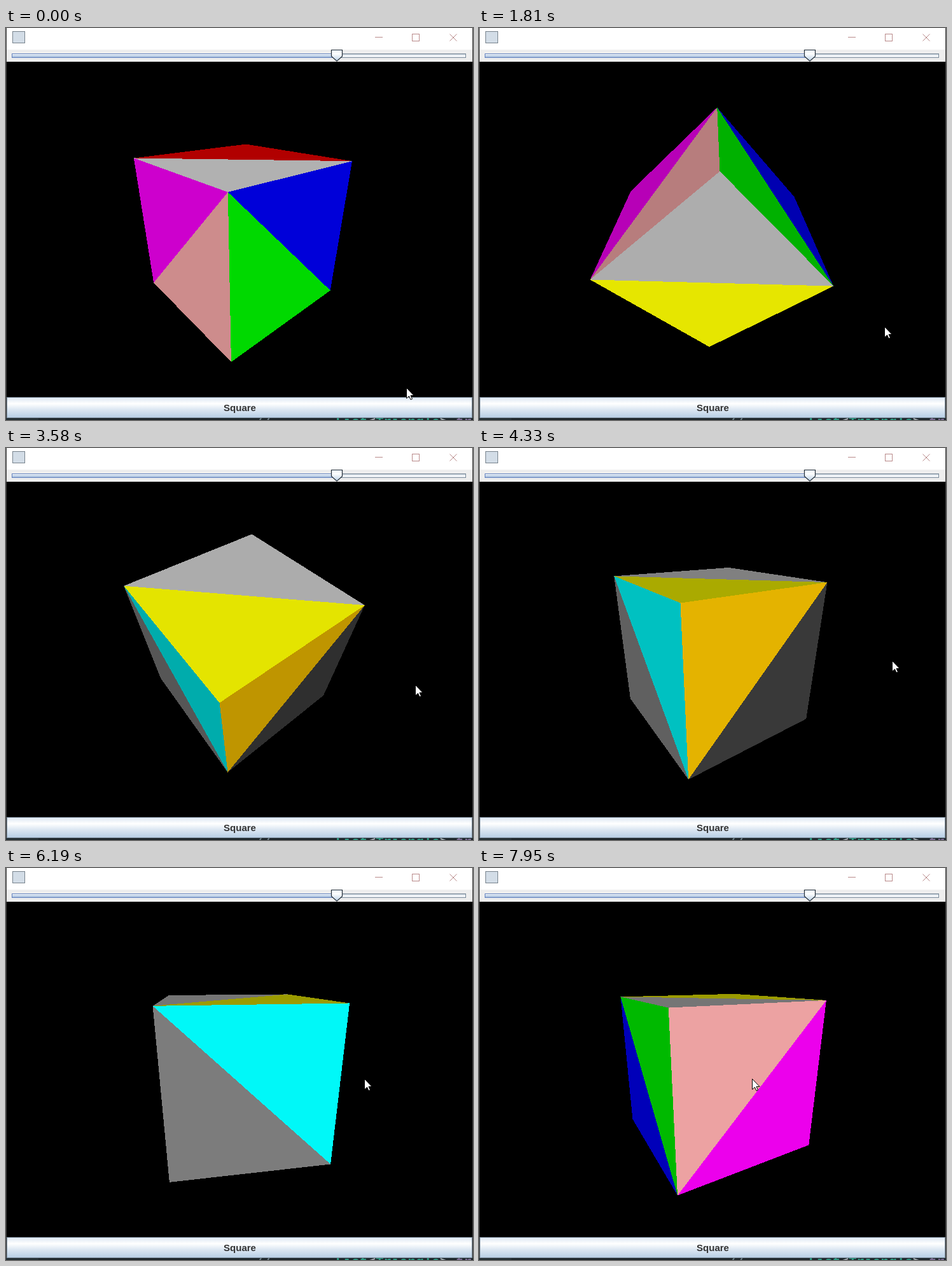
Write an HTML page with a canvas that moves like this. It is 734 by 616 pixels and loops after 8 s.

```html
<!DOCTYPE html>
<html lang="en">
<head>
<meta charset="utf-8">
<title>Cube viewer</title>
<style>
  html, body { margin: 0; width: 100%; height: 100%; overflow: hidden; background: #1e272c; }
  canvas { display: block; }
</style>
</head>
<body>
<canvas id="stage" width="734" height="616"></canvas>
<script>
const ctx = document.getElementById('stage').getContext('2d');
const LOOP = 8000;
const CX = 368, CY = 317, FOCAL = 435, DIST = 4;
const RAD_PER_PX = 0.01396;
const LAG = 45; // the cube trails the mouse by this many ms
const MOUSE = { x: 630, y: 566 };
const HEADING = -0.072, PITCH = 0.435;

// Mouse drags; bend > 0 slows down towards the end, bend < 0 speeds up.
const DRAGS = [
  { from: 40, to: 430, dx: 2, dy: -14, bend: 0 },
  { from: 920, to: 1810, dx: 6, dy: -82, bend: 0.28 },
  { from: 2590, to: 3580, dx: 6, dy: -97, bend: 0 },
  { from: 3940, to: 4430, dx: 6, dy: -40, bend: 0.5 },
  { from: 4590, to: 6370, dx: -97, dy: -1, bend: -0.48 },
  { from: 6780, to: 7950, dx: -123, dy: 0, bend: -0.08 }
];

const gray = v => [v, v, v];
const CAPS = [
  [gray(255), [255, 0, 0]],
  [gray(192), [255, 255, 0]]
];
// Each side: colour at its lower even corner, colour at its upper odd corner.
const SIDES = [
  [[0, 255, 0], [0, 0, 255]],
  [[255, 200, 0], gray(64)],
  [[0, 255, 255], gray(128)],
  [[255, 175, 175], [255, 0, 255]]
];

function dragged(t) {
  let x = 0, y = 0;
  for (const { from, to, dx, dy, bend } of DRAGS) {
    const u = Math.min(1, Math.max(0, (t - from) / (to - from)));
    const done = u + bend * u * (1 - u);
    x += dx * done;
    y += dy * done;
  }
  return { x, y };
}

function rect(color, x, y, w, h) {
  ctx.fillStyle = color;
  ctx.fillRect(x, y, w, h);
}

function poly(points, fill, stroke, width) {
  ctx.beginPath();
  points.forEach(([x, y]) => ctx.lineTo(x, y));
  ctx.closePath();
  ctx.fillStyle = fill;
  ctx.fill();
  ctx.strokeStyle = stroke;
  ctx.lineWidth = width;
  ctx.stroke();
}

function strokeLine(x1, y1, x2, y2) {
  ctx.beginPath();
  ctx.moveTo(x1, y1);
  ctx.lineTo(x2, y2);
  ctx.stroke();
}

function vertical(y1, y2, ...stops) {
  const g = ctx.createLinearGradient(0, y1, 0, y2);
  stops.forEach(([at, color]) => g.addColorStop(at, color));
  return g;
}

// Hard-edged scanline fill, without antialiasing.
function fillTriangle(color, pts) {
  ctx.fillStyle = color;
  const ys = pts.map(p => p[1]);
  const last = Math.ceil(Math.max(...ys));
  for (let y = Math.floor(Math.min(...ys)); y < last; y++) {
    const mid = y + 0.5, xs = [];
    pts.forEach((p, i) => {
      const q = pts[(i + 1) % 3];
      if ((p[1] <= mid) !== (q[1] <= mid))
        xs.push(p[0] + (q[0] - p[0]) * (mid - p[1]) / (q[1] - p[1]));
    });
    if (xs.length < 2) continue;
    const x1 = Math.round(Math.min(...xs)), x2 = Math.round(Math.max(...xs));
    ctx.fillRect(x1, y, x2 - x1, 1);
  }
}

function drawCube(t) {
  const move = dragged(t);
  const heading = HEADING + move.x * RAD_PER_PX;
  const pitch = PITCH + move.y * RAD_PER_PX;
  const c = Math.cos(pitch), s = Math.sin(pitch);
  const turn = i => heading + i * Math.PI / 2;

  const ring = y => [0, 1, 2, 3].map(i => {
    const x = Math.SQRT2 * Math.sin(turn(i)), z = Math.SQRT2 * Math.cos(turn(i));
    const scale = FOCAL / (DIST - y * s - z * c);
    return [CX + x * scale, CY - (y * c - z * s) * scale];
  });
  const top = ring(1), bottom = ring(-1);

  // Two triangles share the diagonal a-b; facing is the normal's depth.
  const face = (facing, colors, tips, a, b) => {
    if (facing * DIST <= 1) return;
    const shade = Math.pow(facing, 1 / 2.4);
    colors.forEach((color, i) => {
      fillTriangle(`rgb(${color.map(v => Math.floor(v * shade))})`, [tips[i], a, b]);
    });
  };

  [top, bottom].forEach((p, i) => face(i ? -s : s, CAPS[i], [p[0], p[2]], p[1], p[3]));
  SIDES.forEach((colors, i) => {
    const next = (i + 1) % 4;
    const [even, odd] = i % 2 ? [next, i] : [i, next];
    face(Math.cos(turn(i + 0.5)) * c, colors, [bottom[even], top[odd]], top[even], bottom[odd]);
  });
}

function drawCursor(t) {
  const move = dragged(t);
  const x = Math.round(MOUSE.x + move.x) - 0.5;
  const y = Math.round(MOUSE.y + move.y) - 0.5;
  const arrow = [[0, 0], [0, 16.5], [4, 13], [6.5, 18.5], [9, 17.5], [6.5, 12], [11.5, 12]];
  poly(arrow.map(([dx, dy]) => [x + dx, y + dy]), '#fff', '#000', 1);
}

function drawEditor() {
  rect('#1e272c', 0, 0, 734, 616);
  rect('#253035', 0, 612, 51, 4);
  ctx.font = 'bold 21px "Liberation Mono", monospace';
  ctx.textAlign = 'left';
  const write = (text, color, x) => {
    ctx.fillStyle = color;
    ctx.fillText(text, x, 625);
    return x + ctx.measureText(text).width;
  };
  write('//', '#6d7f86', 392);
  let x = write('List', '#2f9c84', 518);
  x = write('<', '#a0a8ac', x);
  x = write('Triangle', '#2f9c84', x);
  x = write('>', '#a0a8ac', x);
  write(' tr', '#7d6c93', x);
}

function drawTitleBar() {
  rect('#fff', 1, 0, 732, 34);
  rect('#77828c', 10, 5, 20, 19);
  rect('#d3dde7', 11, 6, 18, 17);
  ctx.strokeStyle = '#b98a8a';
  ctx.lineWidth = 1;
  strokeLine(580, 14.5, 592, 14.5);
  ctx.strokeRect(638.5, 9.5, 11, 11);
  strokeLine(697.5, 9.5, 708.5, 20.5);
  strokeLine(708.5, 9.5, 697.5, 20.5);
}

function drawSlider() {
  rect('#eee', 1, 34, 732, 19);
  rect('#7a8a99', 9, 40, 714, 7);
  rect('#eef2f6', 10, 41, 712, 5);
  rect('#b8c4d0', 10, 41, 712, 1);
  rect('#6382bf', 9, 40, 506, 7);
  rect(vertical(41, 46, [0, '#ffffff'], [0.4, '#c8d9ec'], [1, '#a3b8d8']), 10, 41, 505, 5);
  const knob = vertical(34, 52, [0, '#dde8f3'], [0.35, '#ffffff'], [1, '#b8cfe5']);
  poly([[511.5, 34.5], [528.5, 34.5], [528.5, 44.5], [520, 52], [511.5, 44.5]], knob, '#26303a', 1.2);
}

function drawButton() {
  rect('#7a8a99', 1, 580, 732, 33);
  rect(vertical(581, 612, [0, '#dde8f3'], [0.3, '#ffffff'], [0.6, '#dce7f2'], [1, '#b8cfe5']), 2, 581, 730, 31);
  ctx.font = 'bold 15px "Liberation Sans", Arial, sans-serif';
  ctx.textAlign = 'center';
  ctx.fillStyle = '#333';
  ctx.fillText('Square', 367.5, 602);
}

function draw(t) {
  drawEditor();
  rect('#3c3c3c', 0, 0, 734, 612);
  drawTitleBar();
  drawSlider();
  rect('#000', 1, 53, 732, 527);
  drawCube(t);
  drawButton();
  drawCursor(t + LAG);
}

const start = performance.now();
function tick() {
  draw((performance.now() - start) % LOOP);
  requestAnimationFrame(tick);
}
tick();
</script>
</body>
</html>
```
